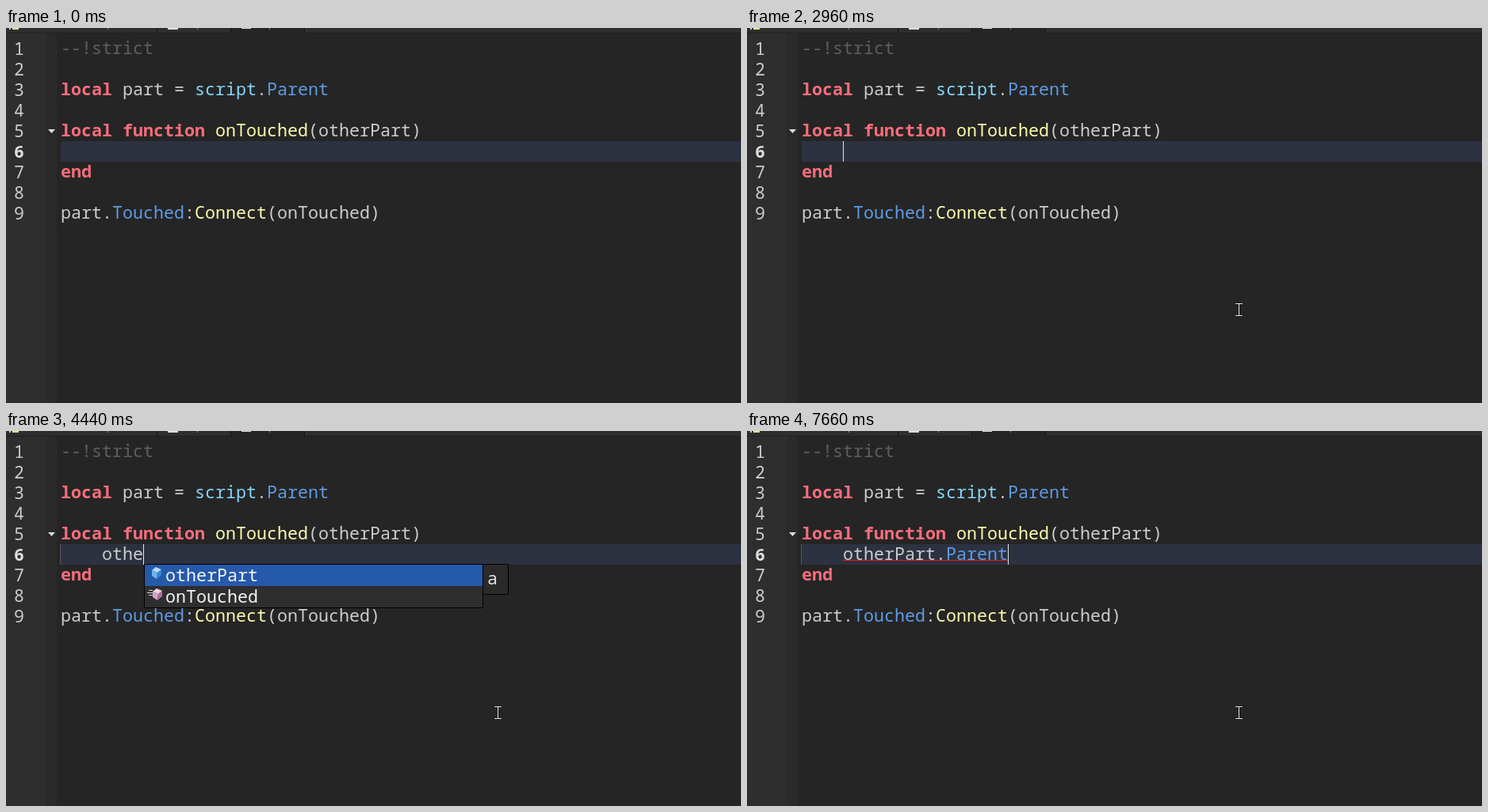
Recreate the animation shown at these times as an HTML page with a canvas. Size 927 by 474 pixels, loop 8 s.

```html
<!DOCTYPE html>
<html lang="en">
<head>
<meta charset="utf-8">
<title>Code editor</title>
<style>
html, body { margin: 0; width: 100%; height: 100%; overflow: hidden; background: #252525; }
canvas { display: block; }
</style>
</head>
<body>
<canvas id="stage" width="927" height="474"></canvas>
<script>
const ctx = document.getElementById('stage').getContext('2d');
const LOOP = 8000, CHAR = 13, ROW = 26, LEFT = 69;
const FONT = '21.667px "Noto Sans Mono", "DejaVu Sans Mono", monospace';
const PLAIN = '#cccccc', KEY = '#f86d7c', FUNC = '#fdfbac', BUILTIN = '#84d6f7', PROP = '#5f9be3';

// Each line is a list of [text, colour] runs.
const code = {
  1: [['--!strict', '#5e5e5e']],
  3: [['local', KEY], [' part = ', PLAIN], ['script', BUILTIN], ['.', PLAIN], ['Parent', PROP]],
  5: [['local function', KEY], [' onTouched', FUNC], ['(otherPart)', PLAIN]],
  7: [['end', KEY]],
  9: [['part.', PLAIN], ['Touched', PROP], [':', PLAIN], ['Connect', FUNC], ['(onTouched)', PLAIN]]
};

// Timed states: [start, value]
const typed = [[0, ''], [4000, 'o'], [4140, 'ot'], [4300, 'oth'], [4400, 'othe'], [4500, 'other'],
  [5050, 'otherPart'], [5320, 'otherPart.'], [5780, 'otherPart.P'], [5880, 'otherPart.Pa'],
  [5980, 'otherPart.Par'], [6750, 'otherPart.Pare'], [6890, 'otherPart.Paren'], [6990, 'otherPart.Parent']];
const caret = [[0, 0], [870, 1], [1400, 0], [1930, 1], [2460, 0], [2960, 1], [3490, 0], [4000, 1],
  [4540, 0], [5320, 1], [5580, 0], [5780, 1], [6070, 0], [6600, 1], [7160, 0], [7660, 1]];
const error = [[0, 0], [4980, 1], [5050, 0], [6510, 1], [6750, 0], [7530, 1]];
const popups = {
  o: [['onTouched', 'otherPart', 'os', 'or'], ''],
  ot: [['onTouched', 'otherPart'], 'on'],
  oth: [['otherPart', 'onTouched'], 'a'],
  othe: [['otherPart', 'onTouched'], 'a'],
  other: [['otherPart'], 'a']
};
// Pointer path: [time, x, y]
const path = [[150, 877, 482], [360, 660, 370], [640, 330, 210], [940, 206, 155], [970, 206, 155],
  [1000, 216, 160], [1130, 216, 160], [1190, 280, 175], [2340, 280, 175], [2550, 620, 356]];

const at = (list, t) => list.filter(s => s[0] <= t).pop()[1];

function rect(x, y, w, h, color) {
  ctx.fillStyle = color;
  ctx.fillRect(x, y, w, h);
}

function poly(points, color) {
  ctx.fillStyle = color;
  ctx.beginPath();
  points.forEach(([x, y]) => ctx.lineTo(x, y));
  ctx.fill();
}

function text(s, x, y, color, bold) {
  ctx.font = (bold ? 'bold ' : '') + FONT;
  ctx.fillStyle = color;
  ctx.fillText(s, x, y);
}

function runs(list, row, col = 0) {
  for (const [s, color] of list) {
    text(s, LEFT + col * CHAR, 33 + (row - 1) * ROW, color, color === KEY);
    col += s.length;
  }
}

function tabs() {
  rect(0, 0, 927, 6, '#2e2e2e');
  rect(0, 6, 927, 1, '#202020');
  rect(284, 0, 92, 7, '#252525');
  for (const x of [190, 283, 376]) rect(x, 0, 1, 7, '#151515');
  rect(4, 0, 2, 2, '#cccccc');
  rect(8, 0, 8, 2, '#e3e38a');
  rect(204, 0, 13, 2, '#dddddd');
  rect(297, 0, 12, 1, '#dddddd');
  for (const x of [128, 241, 332]) rect(x, 0, 1, 2, '#8a8a8a');
}

function cube(x, y, light, mid, dark) {
  poly([[x, y + 4], [x + 5, y], [x + 12, y + 3], [x + 7, y + 7]], light);
  poly([[x, y + 4], [x + 7, y + 7], [x + 6, y + 15], [x, y + 11]], mid);
  poly([[x + 7, y + 7], [x + 12, y + 3], [x + 12, y + 10], [x + 6, y + 15]], dark);
}

function icon(name, x, y) {
  if (name !== 'onTouched') return cube(x + 10, y + 3, '#b5dcff', '#6bb5f3', '#3d86cc');
  cube(x + 11, y + 3, '#f4d3e6', '#dba3c8', '#a9719b');
  [5, 8, 11].forEach((dy, i) => rect(x + [6, 4, 6][i], y + dy, [5, 7, 5][i], 1, '#d6d6e0'));
}

function framed(x, y, w, h, color) {
  rect(x, y, w, h, '#000000');
  rect(x + 1, y + 1, w - 2, h - 2, color);
}

function popup([items, hint], x) {
  framed(x, 168, 428, items.length * 27 + 2, '#2e2e2e');
  items.forEach((name, i) => {
    const y = 169 + i * 27;
    if (!i) rect(x + 1, y, 426, 27, '#2559a9');
    icon(name, x, y);
    text(name, x + 27, y + 21, '#f4f4f4');
  });
  framed(x + 427, 168, 33, 39, '#2a2a2a');
  text(hint, x + 433, 194, '#e4e4e4');
}

function pointer(t) {
  if (t < path[0][0]) return;
  const step = Math.floor((t - 150) / 30) * 30 + 150;
  const i = path.findIndex(p => p[0] > step);
  let [, x, y] = path[i < 0 ? path.length - 1 : i - 1];
  if (i > 0) {
    const [a, b] = [path[i - 1], path[i]];
    const k = (step - a[0]) / (b[0] - a[0]);
    x += (b[1] - x) * k;
    y += (b[2] - y) * k;
  }
  x = Math.round(x);
  y = Math.round(y);
  for (const [grow, color] of [[1, '#1b1b1b'], [0, '#e8e8e8']]) {
    const bar = (dx, dy, w, h) =>
      rect(x + dx - grow, y + dy - grow, w + 2 * grow, h + 2 * grow, color);
    bar(-4, -8, 9, 1);
    bar(0, -8, 1, 16);
    bar(-4, 7, 9, 1);
  }
}

function draw(t) {
  const line = at(typed, t);
  const end = LEFT + (4 + line.length) * CHAR;

  rect(0, 0, 927, 474, '#252525');
  rect(0, 7, 50, 467, '#2e2e2e');
  rect(50, 7, 14, 467, '#2a2a2a');
  tabs();
  rect(LEFT, 143, 858, ROW, '#2d3241');
  if (line) rect(68, 143, 1, ROW, '#595959');

  for (let n = 1; n <= 9; n++) {
    text(n, 10, 34 + (n - 1) * ROW, n === 6 ? '#dddddd' : PLAIN, n === 6);
    if (code[n]) runs(code[n], n);
  }
  poly([[53, 128], [62, 128], [57.5, 133]], '#dddddd');

  const dot = line.indexOf('.') + 1 || line.length;
  runs([[line.slice(0, dot), PLAIN], [line.slice(dot), PROP]], 6, 4);
  if (at(error, t)) rect(121, 163, end - 121, 1, '#f01418');
  if (at(caret, t)) rect(end, 143, 1, ROW, '#e6e6e6');
  if (popups[line]) popup(popups[line], end + 1);
  pointer(t);
}

const start = performance.now();
function tick() {
  draw((performance.now() - start) % LOOP);
  requestAnimationFrame(tick);
}
tick();
</script>
</body>
</html>
```
